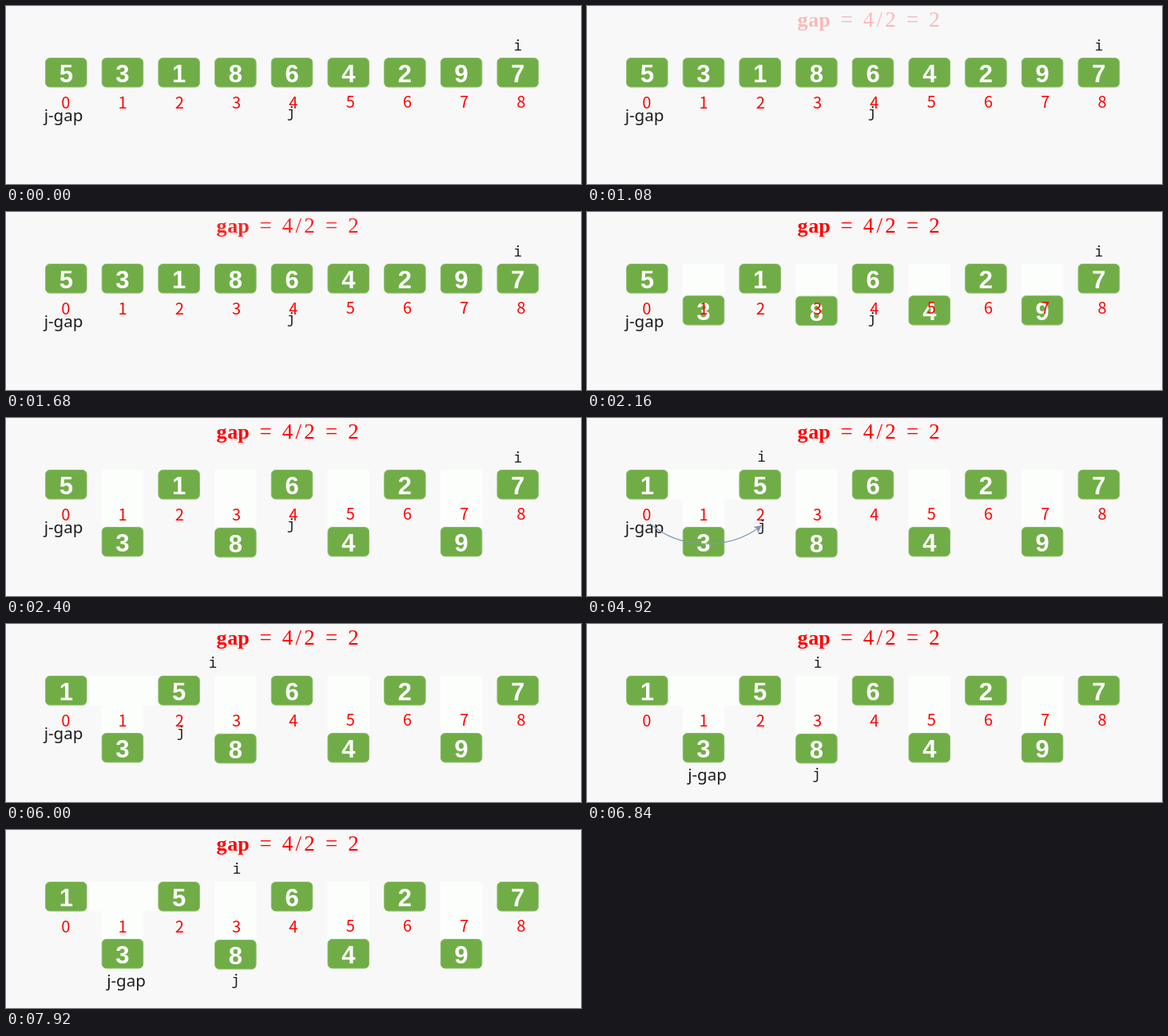
Recreate the animation shown at these times as an HTML page with a canvas. Size 720 by 224 pixels, loop 8 s.

```html
<!DOCTYPE html>
<html lang="en">
<head>
<meta charset="utf-8">
<title>Shell sort: gap = 2</title>
<style>
  html, body { margin: 0; width: 100%; height: 100%; overflow: hidden; background: #f8f8f8; }
  canvas { display: block; }
</style>
</head>
<body>
<canvas id="stage" width="720" height="224"></canvas>
<script>
const ctx = document.getElementById('stage').getContext('2d');
const LOOP = 8000, TICK = 120;
const VALUES = [5, 3, 1, 8, 6, 4, 2, 9, 7];
const BOX = { x: 49, y: 65, pitch: 70.7, w: 52.5, h: 37.5 };
const GHOST = '#fbfefb', INK = '#1c1c1c', RED = '#ff0000';
const FONT = {
  value: 'bold 31px "Liberation Sans", sans-serif',
  index: '300 20px "Noto Sans CJK SC", "Noto Sans CJK", sans-serif',
  label: '300 20.5px "Noto Sans", sans-serif',
  pointer: '300 17.5px "Noto Sans Mono", monospace',
  title: '27px "Liberation Serif", serif',
  titleBold: 'bold 26px "Liberation Serif", serif'
};

const linear = (t, start, duration) => Math.min(1, Math.max(0, (t - start) / duration));
const smooth = (t, start, duration) => {
  const p = linear(t, start, duration);
  return p * p * (3 - 2 * p);
};
const mix = (a, b, p) => a + (b - a) * p;

function text(str, x, y, font, color) {
  ctx.font = font;
  ctx.fillStyle = color;
  ctx.fillText(str, x, y);
}

function rect(x, y, w, h, color) {
  ctx.fillStyle = color;
  ctx.fillRect(x, y, w, h);
}

function drawTitle(alpha) {
  ctx.globalAlpha = alpha;
  [...'gap = 4/2 = 2'].forEach((ch, k) =>
    text(ch, 270 + 13.75 * k, 25.5, k < 3 ? FONT.titleBold : FONT.title, RED));
  ctx.globalAlpha = 1;
}

function drawBox(value, x, y) {
  ctx.beginPath();
  ctx.roundRect(x + 0.5, y + 0.5, BOX.w - 1, BOX.h - 1, 5.5);
  ctx.fillStyle = '#70ad47';
  ctx.fill();
  ctx.strokeStyle = '#8abc68';
  ctx.lineWidth = 1;
  ctx.stroke();
  text(value, x + BOX.w / 2, y + 31, FONT.value, '#ffffff');
}

function drawBoxes(t) {
  const drop = smooth(t, 1891, 500);
  const swap = smooth(t, 4435, 445);
  const columnX = k => BOX.x + BOX.pitch * k;

  // Pale trails stay where boxes have passed.
  if (swap > 0) rect(columnX(0) + BOX.w, BOX.y, 2 * BOX.pitch - BOX.w, BOX.h, GHOST);
  if (drop > 0) {
    for (let k = 1; k < 9; k += 2) rect(columnX(k), BOX.y, BOX.w, Math.max(BOX.h, 72 * drop), GHOST);
  }

  VALUES.forEach((value, k) => {
    const column = k === 0 ? 2 * swap : k === 2 ? 2 - 2 * swap : k;
    const fall = k % 2 ? (k === 3 ? 73 : 72) * drop : 0;
    drawBox(value, columnX(column), BOX.y + fall);
  });
}

// The curve is revealed from the left, then erased from the left.
function drawArrow(dx, dy, shown, erased) {
  if (shown <= erased) return;
  ctx.save();
  ctx.translate(dx, dy);
  ctx.beginPath();
  ctx.rect(76 + 146 * erased, 128, 146 * (shown - erased), 36);
  ctx.clip();
  ctx.strokeStyle = ctx.fillStyle = '#8497b0';
  ctx.lineWidth = 1.2;
  ctx.beginPath();
  ctx.moveTo(79, 133);
  ctx.bezierCurveTo(117, 166, 177, 166, 216, 137.5);
  ctx.stroke();
  ctx.beginPath();
  ctx.moveTo(219, 135);
  ctx.lineTo(208.5, 137);
  ctx.lineTo(213, 139.5);
  ctx.lineTo(214, 145);
  ctx.fill();
  ctx.restore();
}

function drawPointers(t) {
  const restart = smooth(t, 3195, 500);
  const advance = smooth(t, 5755, 445);
  const follow = smooth(t, 6355, 445);
  const iX = mix(mix(641, 218.5, restart), 289, advance);
  const jX = mix(mix(357, 219, restart), 287.5, follow);
  const jY = mix(mix(140, 142, restart), 194.5, follow);
  text('i', iX, mix(56, 55, restart), FONT.pointer, INK);
  text('j', jX, jY, FONT.pointer, INK);
  text('j-gap', mix(72, 150.5, follow), mix(144.5, 197, follow), FONT.label, INK);
}

function draw(t) {
  rect(0, 0, 720, 224, '#f8f8f8');
  ctx.textAlign = 'center';
  drawTitle(linear(t, 820, 1000));
  drawBoxes(t);
  VALUES.forEach((_, k) => text(k, 74.7 + 71.3 * k, 129.4 - 0.2 * k, FONT.index, RED));
  drawPointers(t);
  drawArrow(0, 0, linear(t, 3910, 400), linear(t, 5120, 520));
  drawArrow(71, 56, linear(t, 6910, 400), linear(t, 7400, 520));
}

function frame(now) {
  const t = now % LOOP;
  draw(Math.floor(t / TICK) * TICK);
  requestAnimationFrame(frame);
}
requestAnimationFrame(frame);
</script>
</body>
</html>
```
